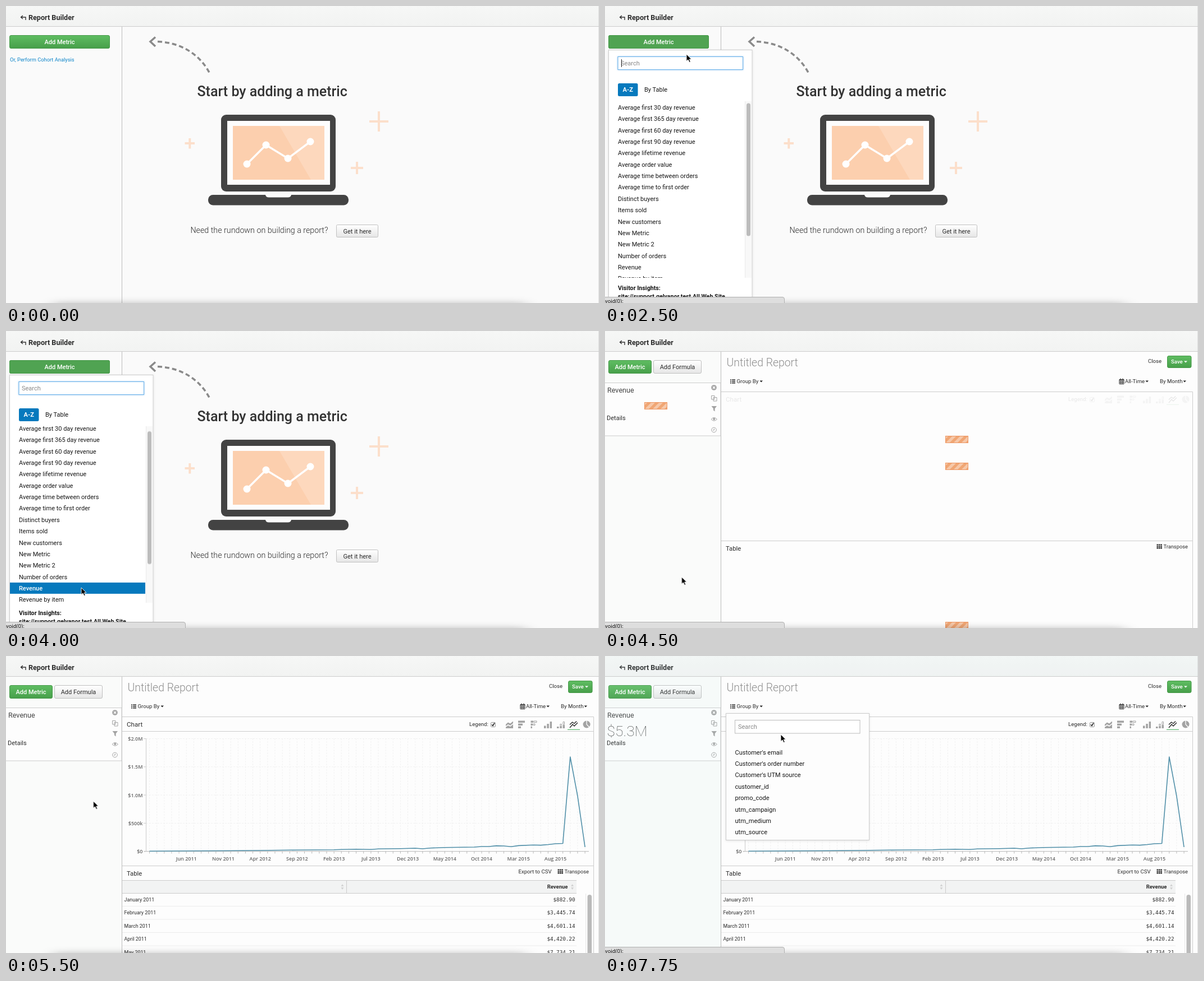
An HTML page that plays this animation: 1056x530 px, repeating every 8 s.

```html
<!DOCTYPE html>
<html lang="en">
<head>
<meta charset="utf-8">
<title>Report Builder</title>
<style>
html, body { margin: 0; width: 100%; height: 100%; overflow: hidden; background: #fafafa; }
svg { display: block; }
#stage { width: 100%; height: 100%; }
text { font-family: Roboto, Arial, sans-serif; font-size: 11px; fill: #2b2b2b; white-space: pre; }
#menu text, #groups text { fill: #161616; }
#menu .white { fill: #fff; }
#menu .hint, #groups .hint { fill: #888; }
.white { fill: #fff; font-weight: 500; }
.bold { font-weight: 600; }
.light { font-weight: 300; }
.small { font-size: 9.6px; }
.end { text-anchor: end; }
.mid { text-anchor: middle; }
.axis { font: 600 9px "Open Sans", Verdana, sans-serif; fill: #666; }
.money { font: 9.25px "DejaVu Sans Mono", monospace; text-anchor: end; }
.rule { fill: none; stroke: #ccc; }
.icon { fill: #a3a3a3; }
.iconline { fill: none; stroke: #a3a3a3; }

/* One loop is 32 steps of 250 ms, 3.125% each. */
.timed { animation: 8s step-end infinite; }
#start { animation-name: start; }
#pressed { animation-name: pressed; }
#menu { animation-name: menu; }
#caret { animation-name: caret; }
#list { animation-name: scroll; }
#thumb { animation-name: thumb; }
#builder { animation-name: builder; }
#loading { animation-name: loading; }
#tools { animation-name: tools; }
#loaded { animation-name: loaded; }
#total { animation-name: total; }
#groups { animation-name: groups; }
#tint { animation-name: tint; }
#status { animation-name: status; }
#cursor { animation-name: cursor; }
.hot { visibility: hidden; animation: hot 8s step-end infinite; }
.stripes { animation: stripes 1s steps(4) infinite; }

@keyframes start { 0% { visibility: visible } 53.125%, 100% { visibility: hidden } }
@keyframes pressed { 0%, 53.125%, 100% { visibility: hidden } 15.625% { visibility: visible } }
@keyframes menu { 0%, 53.125%, 100% { visibility: hidden } 18.75% { visibility: visible } }
@keyframes caret { 0%, 25%, 37.5%, 100% { visibility: hidden } 18.75%, 31.25% { visibility: visible } }
@keyframes scroll { 0%, 100% { transform: none } 43.75% { transform: translateY(-7px) } }
@keyframes thumb { 0%, 100% { transform: none } 43.75% { transform: translateY(5.5px) } }
@keyframes hot { 0% { visibility: visible } 3.125%, 100% { visibility: hidden } }
@keyframes builder { 0% { visibility: hidden } 53.125%, 100% { visibility: visible } }
@keyframes loading { 0%, 65.625%, 100% { visibility: hidden } 53.125% { visibility: visible } }
@keyframes tools { 0% { opacity: .1 } 65.625%, 100% { opacity: 1 } }
@keyframes loaded { 0% { visibility: hidden } 65.625%, 100% { visibility: visible } }
@keyframes total { 0% { visibility: hidden } 71.875%, 100% { visibility: visible } }
@keyframes groups { 0% { visibility: hidden } 90.625%, 100% { visibility: visible } }
@keyframes tint { 0% { visibility: hidden } 93.75%, 100% { visibility: visible } }
@keyframes status { 0%, 62.5% { visibility: hidden } 25%, 90.625%, 100% { visibility: visible } }
@keyframes stripes { to { transform: translateX(14px) } }
@keyframes cursor {
  0%, 100% { transform: translate(-30px, -30px) }
  3.125% { transform: translate(424px, 149px) }
  6.25% { transform: translate(318px, 92px) }
  9.375% { transform: translate(210px, 56px) }
  12.5% { transform: translate(158px, 60px) }
  15.625% { transform: translate(145px, 66px) }
  31.25% { transform: translate(145px, 86px) }
  34.375% { transform: translate(146px, 142px) }
  37.5% { transform: translate(142px, 222px) }
  40.625% { transform: translate(138px, 343px) }
  43.75% { transform: translate(135px, 438px) }
  46.875% { transform: translate(134px, 458px) }
  53.125% { transform: translate(134px, 455px) }
  56.25% { transform: translate(136.5px, 439px) }
  59.375% { transform: translate(142px, 396px) }
  62.5% { transform: translate(149px, 336px) }
  65.625% { transform: translate(154px, 280px) }
  68.75% { transform: translate(155.5px, 259px) }
  71.875% { transform: translate(156px, 257px) }
  78.125% { transform: translate(185px, 218px) }
  81.25% { transform: translate(238px, 144px) }
  84.375% { transform: translate(266px, 105px) }
  87.5% { transform: translate(264px, 89px) }
  93.75% { transform: translate(288px, 112px) }
  96.875% { transform: translate(313px, 140px) }
}
</style>
</head>
<body>
<svg id="stage" viewBox="0 0 1056 530">
  <defs>
    <linearGradient id="green" x2="0" y2="1"><stop stop-color="#5fbd62"/><stop offset="1" stop-color="#479f4a"/></linearGradient>
    <linearGradient id="gray" x2="0" y2="1"><stop stop-color="#fff"/><stop offset="1" stop-color="#e6e6e6"/></linearGradient>
    <linearGradient id="bar" x2="0" y2="1"><stop stop-color="#f6f7f6"/><stop offset="1" stop-color="#f2f3f2"/></linearGradient>
    <filter id="drop" x="-10%" y="-10%" width="120%" height="120%"><feDropShadow dx="0" dy="1" stdDeviation="2" flood-opacity=".1"/></filter>
    <filter id="glow" x="-10%" y="-50%" width="120%" height="200%"><feDropShadow dx="0" dy="0" stdDeviation="1.8" flood-color="#66afe9" flood-opacity=".7"/></filter>
    <filter id="soft" x="-10%" y="-200%" width="120%" height="500%"><feGaussianBlur stdDeviation="14 6"/></filter>
    <clipPath id="listclip"><rect x="7" y="170" width="241" height="315"/></clipPath>
  </defs>

  <rect width="1056" height="530" fill="#fafafa"/>
  <rect width="1056" height="36" fill="url(#bar)"/>
  <path class="rule" d="M0 36.5H1056"/>
  <path class="rule" stroke-opacity=".6" d="M1055.5 0V530"/>
  <path d="M35 25V20H27M30 17L26.5 20L30 23" fill="none" stroke="#333" stroke-width="1.4"/>
  <text class="bold" x="40" y="25" style="font-size:12.6px">Report Builder</text>
  <path d="M206.5 37V530" stroke="#bdbdbd"/>

  <g id="start" class="timed">
    <rect x="6.5" y="52.5" width="178" height="23" rx="2.5" fill="url(#green)" stroke="#449847"/>
    <rect id="pressed" class="timed" x="6.5" y="52.5" width="178" height="23" rx="2.5" fill="#50a352" stroke="#449847"/>
    <text class="white mid" x="95.5" y="68">Add Metric</text>
    <text x="7" y="98.5" style="font-size:9.3px;fill:#0b84c9">Or, Perform Cohort Analysis</text>
    <g fill="none" stroke="#8a8a8a" stroke-width="3.5">
      <path d="M266 55.5L257 63.5L266 72"/>
      <path d="M270 63.5C310 65 345 85 363.5 121.5" stroke-dasharray="8 5"/>
    </g>
    <text x="340.5" y="161" style="font-size:25px;font-weight:500;fill:#333">Start by adding a metric</text>
    <rect x="383" y="194" width="204" height="137" rx="9" fill="#434343"/>
    <path d="M394 205H577V319H394Z" fill="#fdfdfd"/>
    <path d="M404 214H567V310H404Z" fill="#fccfae"/>
    <path d="M487 214H567V310H543Z" fill="#fdd8bd"/>
    <path d="M429 282L463 248L502 272L542 242" fill="none" stroke="#fff" stroke-width="3.5"/>
    <g fill="#fff"><circle cx="429" cy="282" r="6.5"/><circle cx="463" cy="248" r="6.5"/><circle cx="502" cy="272" r="6.5"/><circle cx="542" cy="242" r="6.5"/></g>
    <rect x="360" y="337" width="250" height="18.5" rx="8.5" fill="#434343"/>
    <path d="M462 337H508Q507 341.5 502 341.5H468Q463 341.5 462 337Z" fill="#fafafa"/>
    <path d="M647 206H681M664 188V224M318.5 245H336M327.3 236V254.5M614 289H636M625 278V300" stroke="#fcdfcb" stroke-width="4"/>
    <text class="light" x="328.5" y="405" style="font-size:14.25px">Need the rundown on building a report?</text>
    <rect x="588.5" y="390.5" width="74" height="22" rx="2" fill="url(#gray)" stroke="#c0c0c0"/>
    <text class="mid" x="625.5" y="405.5">Get it here</text>
  </g>

  <g id="menu" class="timed">
    <rect x="6.5" y="78.5" width="255.5" height="470" fill="#fff" stroke="#ccc" filter="url(#drop)"/>
    <rect x="23" y="90.5" width="222.5" height="23" fill="#fff" stroke="#66afe9" filter="url(#glow)"/>
    <text class="hint" x="28" y="106">Search</text>
    <path id="caret" class="timed" d="M29.5 95V109" stroke="#222"/>
    <rect x="23" y="138" width="35.5" height="23" rx="2.5" fill="#0679bd"/>
    <text class="white bold mid" x="40.7" y="153">A-Z</text>
    <text x="70" y="153">By Table</text>
    <g clip-path="url(#listclip)"><g id="list" class="timed"></g></g>
    <path d="M249 170H261V485H249Z" fill="#f8f8f8"/><path d="M249.5 170V485" stroke="#eaeaea"/>
    <rect id="thumb" class="timed" x="252" y="173.5" width="7" height="237" rx="3.5" fill="#bcbcbc"/>
    <text class="bold" x="23" y="507" style="font-size:10.7px">Visitor Insights:</text>
    <text class="bold" x="23" y="522" style="font-size:10.7px">site://support.qelvanor.test All Web Site</text>
  </g>

  <g id="builder" class="timed">
    <path d="M0 37H206V530H0Z" fill="#fafbfa"/>
    <path d="M207 37H1055V530H207Z" fill="#fdfdfd"/>
    <rect x="6.5" y="52.5" width="76" height="23" rx="2.5" fill="url(#green)" stroke="#449847"/>
    <text class="white mid" x="44.5" y="68">Add Metric</text>
    <rect x="86.5" y="52.5" width="85" height="23" rx="2.5" fill="url(#gray)" stroke="#c0c0c0"/>
    <text class="mid" x="129" y="68">Add Formula</text>
    <path d="M-1 92.5H206V187H-1Z" fill="#fdfdfd" stroke="#ccc"/>
    <text x="4" y="110" style="font-size:12.6px;fill:#444">Revenue</text>
    <text x="3" y="159">Details</text>
    <circle class="icon" cx="194" cy="101" r="4.8"/>
    <path d="M192 99L196 103M196 99L192 103" stroke="#fff" stroke-width="1.3"/>
    <path class="iconline" d="M189.5 115.5H195V122H189.5ZM193 118.5H199V125H193Z"/>
    <path class="icon" d="M189.5 134H199L195.6 138.5V143.5L193 141.5V138.5Z"/>
    <path class="iconline" d="M189 157.5Q194 151.5 199.5 157.5Q194 163 189 157.5Z"/><circle class="icon" cx="194.2" cy="157" r="2"/>
    <circle class="iconline" cx="194" cy="176.5" r="4.3"/><path class="iconline" d="M194.3 174V177H192"/>

    <text class="light" x="216.5" y="63" style="font-size:19.4px;fill:#8e8e8e">Untitled Report</text>
    <text class="small" x="967" y="57">Close</text>
    <rect x="1001.5" y="44.5" width="42.5" height="21" rx="2.5" fill="url(#green)" stroke="#449847"/>
    <text class="white small" x="1008" y="58">Save</text>
    <path d="M1031 53.5H1037L1034 56.5Z" fill="#fff"/>
    <path d="M223 87.3H225M226 87.3H232M223 90H225M226 90H232M223 92.8H225M226 92.8H232" stroke="#222" stroke-width="1.6"/>
    <text class="small" x="234.5" y="93">Group By</text>
    <path d="M275.5 88.5H281L278.2 91.5ZM962.5 88.5H968L965.2 91.5ZM1029.5 88.5H1035L1032.2 91.5Z" fill="#222"/>
    <path d="M916 86.5H924V94.5H916ZM916 88H924M918 84.5V87M922 84.5V87M918.7 88V94.5M921.4 88V94.5M916 91.3H924" fill="none" stroke="#222"/>
    <text class="small" x="926" y="93">All-Time</text>
    <text class="small" x="988" y="93">By Month</text>
    <path class="rule" d="M207 108.5H1046.5V530M207 374.5H1046"/>
    <text x="215" y="391.5" style="font-size:11.3px">Table</text>
    <path d="M982.5 381.5H992M982.5 384.5H992M982.5 387.3H992" stroke="#222" stroke-width="2.2" stroke-dasharray="2.7 .7"/>
    <text x="994.5" y="387.5" style="font-size:9.3px">Transpose</text>

    <g id="tools" class="timed">
      <text x="215" y="126" style="font-size:11.6px">Chart</text>
      <text class="small" x="825" y="125">Legend:</text>
      <rect x="863.5" y="118.5" width="8" height="8" rx="1.5" fill="#fff" stroke="#999"/>
      <path d="M865 122.5L867 124.5L870 119.5" fill="none" stroke="#222" stroke-width="1.5"/>
      <path class="icon" d="M890 122L894 118.5L898 120.5L903 116.5V120L898 124L894 122L890 125ZM890 127L894 124L898 126L903 122V129H890Z"/>
      <path class="icon" d="M912 115.5H924V119H912ZM912 120.5H920V124H912ZM912 125.5H917V129H912Z"/>
      <path class="icon" d="M934.5 115.5H939V119H934.5ZM934.5 120.5H938V124H934.5ZM934.5 125.5H937V129H934.5Z"/>
      <path class="iconline" d="M940 116H945V118.5H940ZM939 121H942V123.5H939Z"/>
      <path class="icon" d="M958 124.5H961.5V129H958ZM963.3 121H966.8V129H963.3ZM968.6 117H972V129H968.6Z"/>
      <path class="icon" d="M981 126H984.5V129H981ZM986.3 125H989.8V129H986.3ZM991.5 123H995V129H991.5Z"/>
      <path class="iconline" d="M986.8 121.5H989.3V124H986.8ZM992 117.5H994.5V122H992Z"/>
      <path d="M1004 128L1009 122L1012 125L1018 119M1004 122.5L1008.5 118L1012 120.5L1016 116.5" fill="none" stroke="#222" stroke-width="1.3"/>
      <path d="M1000 131.3H1022" stroke="#58b86b" stroke-width="1.2"/>
      <circle class="icon" cx="1034" cy="122" r="6.5"/>
      <path d="M1034 115V122L1039 127.5" fill="none" stroke="#fdfdfd" stroke-width="1.3"/>
    </g>
    <g id="loading" class="timed"></g>
  </g>

  <g id="loaded" class="timed">
    <path class="rule" d="M207 134.5H1046"/>
    <g id="chart"></g>
    <text class="small" x="912.5" y="388">Export to CSV</text>
    <path d="M207 401H1016V423H207Z" fill="#f2f3f3"/>
    <path class="rule" d="M207 400.5H1016M207 423.5H1016M606.5 401V423"/>
    <path d="M596.5 411L599 407L601.5 411ZM596.5 413L599 417L601.5 413ZM1006 411L1008.5 407L1011 411ZM1006 413L1008.5 417L1011 413Z" fill="#d2d2d2"/>
    <text class="bold end" x="1000.5" y="415" style="font-size:9.5px">Revenue</text>
    <g id="rows"></g>
    <path d="M1032.5 424V530" stroke="#e8e8e8"/>
    <rect x="1035.5" y="426" width="7.5" height="120" rx="3.7" fill="#bababa"/>
    <text id="total" class="timed" x="3.5" y="142.5" style="font-size:26.5px;font-weight:200;fill:#444">$5.3M</text>
  </g>

  <g id="groups" class="timed">
    <rect x="215.5" y="102.5" width="255" height="226" fill="#fdfdfd" stroke="#ccc" filter="url(#drop)"/>
    <rect x="231.5" y="114.5" width="222.5" height="23.5" fill="#fff" stroke="#bbb"/>
    <text class="hint" x="237" y="130">Search</text>
  </g>

  <path id="tint" class="timed" d="M0 0H1056V36H0ZM0 37H206V530H0Z" fill="#c8eaea" fill-opacity=".08"/>
  <rect x="85" y="530" width="840" height="12" fill-opacity=".25" filter="url(#soft)"/>
  <g id="status" class="timed">
    <path d="M-1 519.5H316Q319.5 519.5 319.5 523V531H-1Z" fill="#dedede" stroke="#b0b0b0"/>
    <text x="0" y="529.5" style="font-size:9.8px;fill:#111">void(0);</text>
  </g>
  <path id="cursor" class="timed" d="M0 0V12.5L3 9.8L5.2 14.5L7.3 13.5L5.2 9H9Z" fill="#000" stroke="#fff" stroke-width=".9"/>
</svg>

<script>
const fill = (id, markup) => document.getElementById(id).insertAdjacentHTML("beforeend", markup);
const text = (x, y, label, cls = "", style = "") => `<text x="${x}" y="${y}" class="${cls}" style="${style}">${label}</text>`;
const path = (d, attrs) => `<path d="${d}" fill="none" ${attrs}/>`;
const range = n => [...Array(n).keys()];

// Metric list, with the rows the pointer passes over
const metrics = ["Average first 30 day revenue", "Average first 365 day revenue", "Average first 60 day revenue",
  "Average first 90 day revenue", "Average lifetime revenue", "Average order value", "Average time between orders",
  "Average time to first order", "Distinct buyers", "Items sold", "New customers", "New Metric", "New Metric 2",
  "Number of orders", "Revenue", "Revenue by item"];
const rowY = i => 185 + 20.35 * i;
const hovers = [[2, 3], [8, 3.25], [13, 3.5], [14, 3.75], [14, 4]];
fill("list", metrics.map((name, i) => text(23, rowY(i), name)).join("") +
  hovers.map(([i, time]) => `<g class="hot" style="animation-delay:${time}s">
    <rect x="7" y="${rowY(i) - 14}" width="241" height="20" fill="#0679bd"/>${text(23, rowY(i), metrics[i], "white")}</g>`).join(""));

const groupNames = ["Customer's email", "Customer's order number", "Customer's UTM source", "customer_id",
  "promo_code", "utm_campaign", "utm_medium", "utm_source"];
fill("groups", groupNames.map((name, i) => text(231.5, 175.5 + 20.4 * i, name)).join(""));

// Striped progress bars
const stripes = range(6).map(i => `M${i * 14 - 28} 13l13 -13h7l-13 13z`).join("");
const loader = (x, y) => `<svg x="${x}" y="${y}" width="41" height="13">
  <rect width="41" height="13" fill="#f6c8a9"/><path class="stripes" d="${stripes}" fill="#f0a674"/>
  <rect x=".5" y=".5" width="40" height="12" fill="none" stroke="#ee9560"/></svg>`;
fill("loading", loader(70, 127) + loader(606, 187) + loader(606, 235) + loader(606, 519));

// Chart: one point per month, January 2011 to December 2015
const monthX = i => 255.5 + 13.145 * i;
const trend = [[0, 348.2], [10, 347.5], [15, 347], [20, 346.2], [25, 345.8], [26, 345.2], [28, 344.8], [30, 345.2], [31, 344.2],
  [34, 343.7], [36, 343], [37, 344], [38, 342.8], [40, 341.7], [44, 341], [45, 340], [46, 340], [47, 338.6], [48, 339], [49, 340.2],
  [50, 338.4], [52, 337.2], [53, 337.6], [54, 336.5], [55, 335], [56, 334.5], [57, 180], [58, 250], [59, 341]];
const labels = ["Jun 2011", "Nov 2011", "Apr 2012", "Sep 2012", "Feb 2013", "Jul 2013", "Dec 2013", "May 2014", "Oct 2014", "Mar 2015", "Aug 2015"];
const scale = ["$2.0M", "$1.5M", "$1.0M", "$500k", "$0"];
const tickY = i => 147.5 + 50.3 * i;
fill("chart",
  path(range(60).map(i => `M${monthX(i)} 147V348`).join("") + scale.map((_, i) => `M250 ${tickY(i)}H1037`).join(""),
    'stroke="#f1f1f1" stroke-dasharray="3 2"') +
  path("M249.5 147V348" + scale.map((_, i) => `M245 ${tickY(i)}H249.5`).join(""), 'stroke="#ccc"') +
  path("M246 348.7H1038" + range(60).map(i => `M${monthX(i)} 349V352.5`).join(""), 'stroke="#b8b8b8"') +
  scale.map((label, i) => text(243.5, tickY(i) + 3.5, label, "axis end")).join("") +
  labels.map((label, i) => text(monthX(5 * i + 5), 364.5, label, "axis mid")).join("") +
  path("M" + trend.map(([i, y]) => `${monthX(i)} ${y}`).join("L"), 'stroke="#508fa8" stroke-width="1.6" stroke-linejoin="round"'));

const table = [["January", "$882.90"], ["February", "$3,445.74"], ["March", "$4,601.14"], ["April", "$4,420.22"], ["May", "$7,734.21"]];
fill("rows", table.map(([month, sum], i) => {
  const y = 437.5 + 23.5 * i;
  return text(210.5, y, month + " 2011", "", "font-size:8.9px") + text(1013.5, y, sum, "money") +
    path(`M207 ${y + 9}H1016`, 'stroke="#ececec"');
}).join(""));
</script>
</body>
</html>
```
